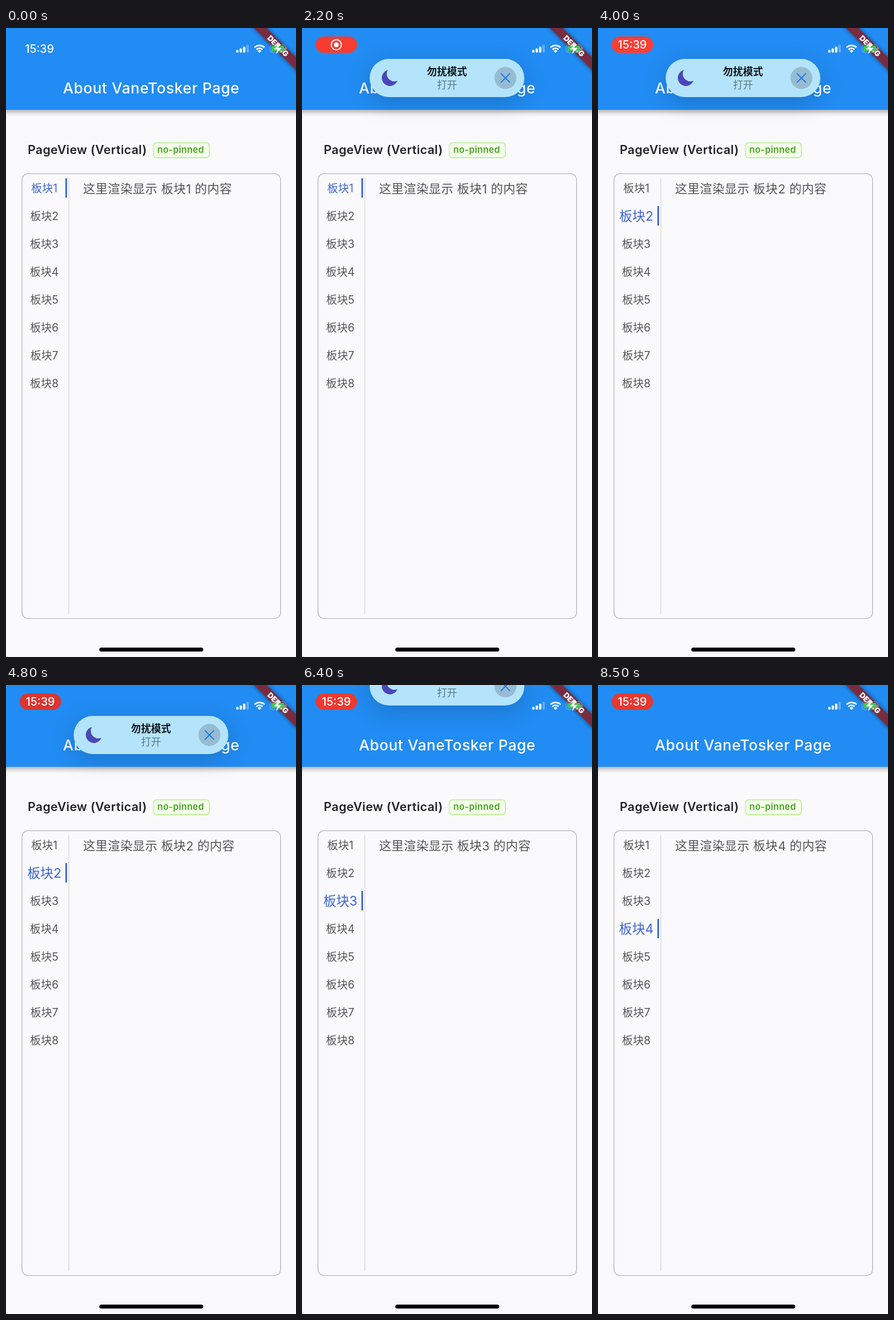
Animation of 480x1038 px, one loop 8.6 s. Source, as an HTML page:

```html
<!DOCTYPE html>
<html lang="zh-CN">
<head>
<meta charset="utf-8">
<title>Vertical tabs</title>
<style>
html, body { margin: 0; width: 100%; height: 100%; overflow: hidden; background: #fafafc; }
svg { display: block; width: 100vw; height: 100vh; }
text { font-family: Inter, "Noto Sans CJK SC", "Noto Sans CJK", "Noto Sans", sans-serif; }
.mid { text-anchor: middle; }
#bar { filter: drop-shadow(0 3px 4px rgba(0, 0, 0, .36)); }
#notice { filter: drop-shadow(0 9px 18px rgba(0, 0, 0, .17)); }
#ribbon rect { filter: drop-shadow(0 0 3px rgba(0, 0, 0, .5)); }
</style>
</head>
<body>
<svg viewBox="0 0 480 1038" preserveAspectRatio="none">
  <defs><clipPath id="view"><rect x="106" y="248" width="346" height="720"/></clipPath></defs>
  <rect width="480" height="1038" fill="#fafafc"/>
  <rect id="bar" x="-10" y="-10" width="500" height="145" fill="#218cf3"/>
  <text class="mid" x="240.4" y="108" font-size="24.6" font-weight="500" letter-spacing=".6" fill="#fff">About VaneTosker Page</text>

  <text x="36" y="208" font-size="20" font-weight="600" letter-spacing=".38" fill="#222">PageView (Vertical)</text>
  <rect x="244" y="189.5" width="92.5" height="24.5" rx="5" fill="#f4ffea" stroke="#b7eb8f" stroke-width="1.3"/>
  <text x="250.5" y="206.3" font-size="14.8" font-weight="600" letter-spacing=".35" fill="#46a31c">no-pinned</text>

  <rect x="26.5" y="240.5" width="428" height="734" rx="10" fill="none" stroke="#b0b0b6" stroke-width="1.2"/>
  <path d="M104 248V967" stroke="#dcdce2" stroke-width="1.5"/>
  <g id="tabs" class="mid" font-size="18"></g>
  <rect id="mark" x="98.3" y="248" width="2.7" height="32" fill="#3d64cc"/>
  <g clip-path="url(#view)"><g id="pages" font-size="20.2" letter-spacing=".36" fill="#555"></g></g>
  <rect x="154.5" y="1022.5" width="172" height="6.5" rx="3.2"/>

  <g id="ribbon" transform="translate(480 0) rotate(45) scale(1.23)">
    <rect x="-50" y="28" width="100" height="12" fill="#792c3f"/>
    <text class="mid" y="37.8" font-size="10.2" font-weight="900" fill="#fff">DEBUG</text>
  </g>

  <g id="notice">
    <rect x="112" y="51" width="256" height="63" rx="31.5" fill="#b4e4fc"/>
    <path d="M142 69.3A13.4 13.4 0 1 0 158 87A12.5 12.5 0 0 1 142 69.3Z" fill="#4b46b8"/>
    <text class="mid" x="240" y="77.5" font-size="16.6" font-weight="700" fill="#10181c">勿扰模式</text>
    <text class="mid" x="240" y="99.5" font-size="16.6" fill="#5d7985">打开</text>
    <circle cx="336.7" cy="82.5" r="18.2" fill="#96bcd2"/>
    <path d="M329.5 75.3l14.4 14.4m0-14.4l-14.4 14.4" stroke="#1f78e4" stroke-width="1.8" stroke-linecap="round"/>
  </g>

  <g fill="#fff">
    <rect x="381" y="36.2" width="3.8" height="4.3" rx="1"/>
    <rect x="386.7" y="33.8" width="3.8" height="6.7" rx="1"/>
    <rect x="392.4" y="30.8" width="3.8" height="9.7" rx="1"/>
    <rect x="398.1" y="27.5" width="3.8" height="13" rx="1" opacity=".3"/>
    <path d="M416.4 37.8a4.6 4.6 0 0 1 6.4 0l-3.2 3.2z"/>
  </g>
  <path d="M411.4 32.2a11.7 11.7 0 0 1 16.4 0M414.5 35.6a7.2 7.2 0 0 1 10.2 0" fill="none" stroke="#fff" stroke-width="2.5"/>
  <rect x="437" y="27.5" width="25.5" height="13" rx="4" fill="none" stroke="#fff" stroke-opacity=".35"/>
  <rect x="439" y="29.5" width="21.5" height="9" rx="2.2" fill="#3fc658"/>
  <path d="M463.9 32v4" stroke="#fff" stroke-opacity=".4" stroke-width="1.6"/>
  <path d="M452.5 25.5L443.5 35.2H449L447 43L456.3 33H450.6Z" fill="#fff"/>

  <text id="clock" class="mid" x="55.5" y="40.5" font-size="18.6" font-weight="500" fill="#fff">15:39</text>
  <g id="pill">
    <rect id="pillBody" x="22.5" y="14" width="68.7" height="27" rx="13.5"/>
    <g id="rec" fill="none" stroke="#fff" stroke-width="1.9">
      <circle cx="56.8" cy="27.7" r="8.4"/>
      <circle cx="56.8" cy="27.7" r="3.9" fill="#fff" stroke="none"/>
    </g>
    <text id="pillTime" class="mid" x="56.8" y="34.2" font-size="18.6" font-weight="500" fill="#fff">15:39</text>
  </g>
</svg>
<script>
const LOOP = 8600, STEP = 100, TAB_GAP = 46, PAGE = 720;
const switches = [3300, 5000, 7300];
const $ = id => document.getElementById(id);
const ramp = (t, from, to) => Math.min(1, Math.max(0, (t - from) / (to - from)));
const smooth = p => p * p * (3 - 2 * p);
const mix = (a, b, p) => `rgb(${a.map((v, i) => Math.round(v + (b[i] - v) * p))})`;

function addText(parent, content, attrs) {
  const el = document.createElementNS('http://www.w3.org/2000/svg', 'text');
  for (const key in attrs) el.setAttribute(key, attrs[key]);
  el.textContent = content;
  return $(parent).appendChild(el);
}

const tabs = [];
for (let i = 0; i < 8; i++) {
  tabs.push(addText('tabs', `板块${i + 1}`, { y: 6.5 }));
  if (i < 4) addText('pages', `这里渲染显示 板块${i + 1} 的内容`, { x: 127.5, y: 273.3 + i * PAGE });
}

function draw(t) {
  const pos = switches.reduce((sum, s) => sum + smooth(ramp(t, s, s + 300)), 0);
  tabs.forEach((tab, i) => {
    const active = Math.max(0, 1 - Math.abs(pos - i));
    const scale = i ? 1 + 0.2 * active : 1; // the first tab never grows
    tab.setAttribute('transform', `translate(63.4 ${264 + i * TAB_GAP}) scale(${scale})`);
    tab.setAttribute('fill', mix([85, 85, 85], [62, 100, 214], active));
  });
  $('mark').setAttribute('y', 248 + pos * TAB_GAP);
  $('pages').setAttribute('transform', `translate(0 ${-pos * PAGE})`);

  const enter = (1 - ramp(t, 150, 900)) ** 3;
  const leave = smooth(ramp(t, 6120, 6590));
  const hidden = enter + leave;
  $('notice').setAttribute('transform', `translate(0 ${-125 * hidden})`);
  $('notice').style.display = hidden >= 1 ? 'none' : '';

  const shown = ramp(t, 100, 300), timed = ramp(t, 2900, 3200);
  const glow = (1 - Math.cos((t - 900) / 2000 * 2 * Math.PI)) / 2;
  $('clock').setAttribute('opacity', 1 - shown);
  $('pill').setAttribute('opacity', shown);
  $('pillBody').setAttribute('fill', mix([216, 54, 50], [255, 62, 50], glow));
  $('rec').setAttribute('opacity', 1 - timed);
  $('pillTime').setAttribute('opacity', timed);
}

function tick() {
  const t = performance.now() % LOOP;
  draw(Math.floor(t / STEP) * STEP);
  requestAnimationFrame(tick);
}
tick();
</script>
</body>
</html>
```
